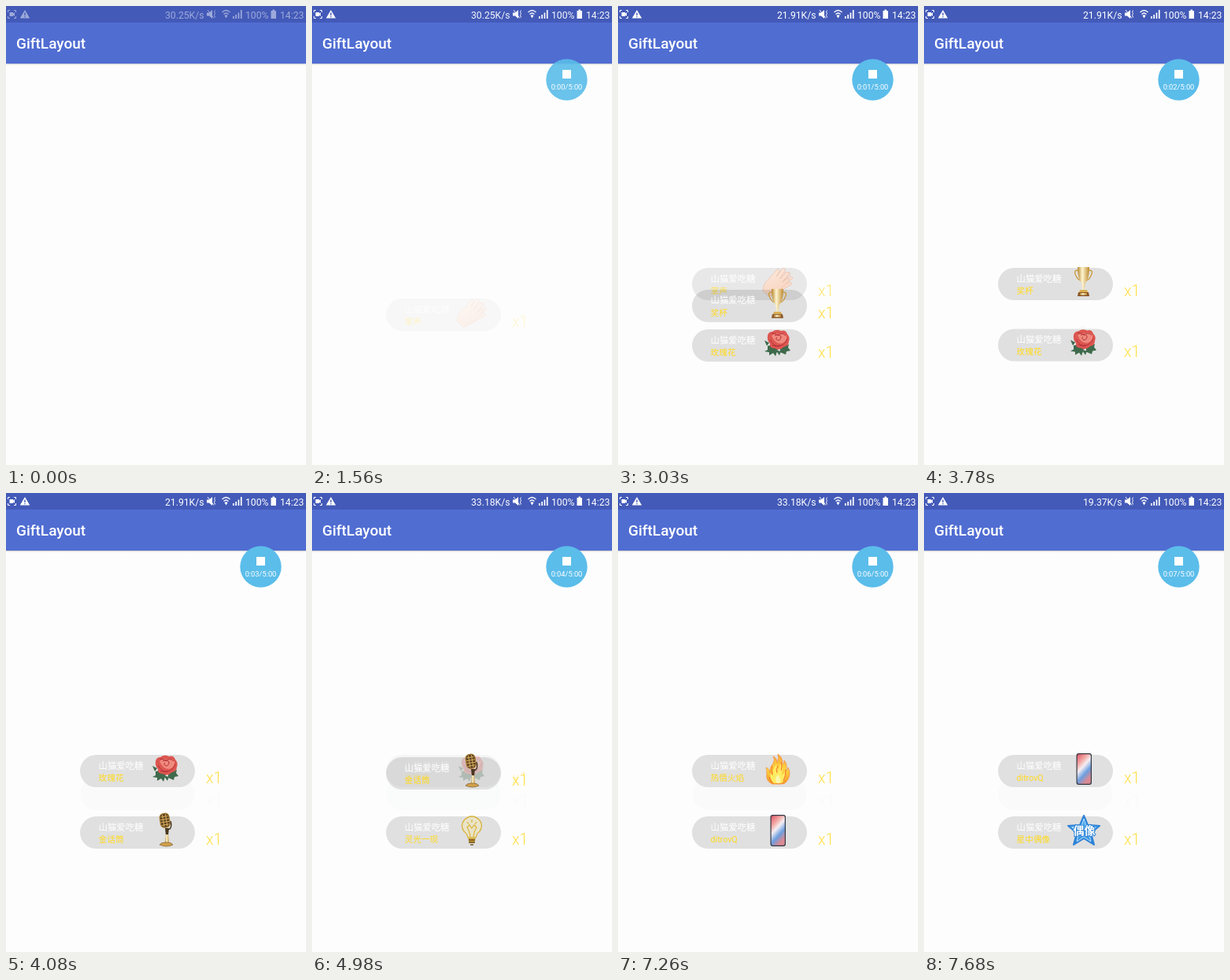
These frames come from a looping animation (381 px wide and 582 px high, 8 s). An HTML page:

```html
<!DOCTYPE html>
<html lang="zh">
<head>
<meta charset="utf-8">
<style>
html, body { margin: 0; width: 100%; height: 100%; overflow: hidden; background: #fdfdfd; }
svg { display: block; width: 100%; height: 100%; font-family: Roboto, "Noto Sans CJK SC", "Noto Sans CJK", sans-serif; }
.status { font-size: 12.2px; fill: #fff; }
.name { font-size: 11.4px; fill: #fff; }
.label { font-size: 10.7px; fill: #ffd91c; }
.count { font-size: 19.5px; font-weight: 300; fill: #ffdf45; }
</style>
</head>
<body>
<svg viewBox="0 0 381 582">
  <defs>
    <linearGradient id="gold"><stop stop-color="#b5852c"/><stop offset=".4" stop-color="#fff6d2"/><stop offset="1" stop-color="#bd8c30"/></linearGradient>
    <linearGradient id="screen" x2=".5" y2="1"><stop stop-color="#e0556a"/><stop offset=".3" stop-color="#f3a9a4"/><stop offset=".5" stop-color="#f6eef2"/><stop offset=".75" stop-color="#6c9fe0"/><stop offset="1" stop-color="#d98a94"/></linearGradient>
    <linearGradient id="sky" x2="0" y2="1"><stop stop-color="#1f79d8"/><stop offset=".5" stop-color="#6cc5f8"/><stop offset="1" stop-color="#1b6fd0"/></linearGradient>
    <linearGradient id="fire" x2="0" y2="1"><stop stop-color="#f9a437"/><stop offset=".5" stop-color="#fdd640"/><stop offset="1" stop-color="#f7982a"/></linearGradient>
    <linearGradient id="skin" x2="1" y2="1"><stop stop-color="#fde3d2"/><stop offset="1" stop-color="#f6c3a8"/></linearGradient>
    <linearGradient id="shade" x2="0" y2="1"><stop stop-color="#000" stop-opacity=".2"/><stop offset="1" stop-color="#000" stop-opacity="0"/></linearGradient>
  </defs>
  <rect width="381" height="582" fill="#fdfdfd"/>
  <rect width="381" height="73" fill="#506dd2"/>
  <rect width="381" height="21" fill="#435ab8"/>
  <rect y="73" width="381" height="2" fill="url(#shade)"/>
  <text x="13" y="54.300" font-size="19" font-weight="500" fill="#fff">GiftLayout</text>
  <g id="status" class="status">
    <path d="M2.500 8V5.500H5M10 5.500h2.500V8M12.500 13v2.500H10M5 15.500H2.500V13" fill="none" stroke="#fff"/>
    <path d="M4.500 8h4.500v1.500l2-1.500v5l-2-1.500V13H4.500z"/>
    <path d="M24 5l6.200 10.500H17.800z"/>
    <path d="M24 8.500v3.500M24 13v1.300" stroke="#435ab8" stroke-width="1.400"/>
    <text id="speed" x="202" y="15.700"></text>
    <path d="M255 8.500h3l4-3.500v11l-4-3.500h-3z"/>
    <path d="M256 5l8 10.500M265.500 5.500l-1 2 1 2-1 2 1 3" fill="none" stroke="#fff"/>
    <path d="M274.500 8q5-5 10 0M276.500 10.500q3-3 6 0" fill="none" stroke="#fff" stroke-width="1.200"/>
    <path d="M277.500 12q2-1.500 4 0l-2 3.500z"/>
    <path d="M288 13h1.700v3h-1.700zM291.300 11h1.700v5h-1.700zM294.600 8.500h1.700v7.500h-1.700zM297.900 5h1.700v11h-1.700z"/>
    <text x="304" y="15.700">100%</text>
    <path d="M338.500 4.500h2.500v1.500h2v10h-6.500V6h2z"/>
    <text x="348" y="15.700">14:23</text>
  </g>
  <g id="trails"></g>
  <g id="gifts"></g>
  <g id="recorder">
    <circle cx="323.500" cy="93.500" r="26.200" fill="#5bbdea"/>
    <rect x="318" y="81" width="11" height="11" fill="#fff"/>
    <text id="timer" x="323.500" y="106" font-size="9.300" fill="#fff" text-anchor="middle"></text>
  </g>
</svg>
<script>
const $ = id => document.getElementById(id);
const clamp = v => Math.max(0, Math.min(1, v));
const LOOP = 8000, TOP = 332, BOTTOM = 410, MOVE = 300;
const moves = [2010, 2910, 3780, 4740, 5640, 6480, 7380];
const seconds = [2010, 3120, 4020, 4950, 5850, 6720, 7620];
const speeds = [[7560, '19.37'], [4860, '33.18'], [2010, '21.91'], [0, '30.25']];

const hand = place => `<g transform="${place}" fill="url(#skin)" stroke="#e0a78c" stroke-width=".5">
  <path d="M-5 14Q-9 8-7 1L-6-11q1-2 3 0l.5 6 .5-10q1.500-2 3 0l.5 10 1.500-9q2-2 3 0l-.5 10 2-6q2-1 2.500 1L8 4Q6 12 3 15z"/></g>`;

const art = {
  clap: hand('translate(204 19) rotate(50) scale(1.2)') + hand('translate(200 18) rotate(36) scale(1.3)'),
  cup: `<path d="M196 3q-7 0-3 7 2 5 6 6M209 3q7 0 3 7-2 5-6 6" fill="none" stroke="#c99a3c" stroke-width="1.300"/>
    <path d="M195-1h15q0 15-5 20l-1.500 9h-2l-1.500-9q-5-5-5-20z" fill="url(#gold)"/>
    <path d="M198 28h9l1 3h-11z" fill="#d9ac4b"/><path d="M196 31h13l1 5h-15z" fill="#8a5526"/>
    <path d="M198 32h9v2.500h-9z" fill="url(#gold)"/>`,
  rose: `<path d="M190 21l9-2 4 6-3 9-3-4-5 3v-4l-6-1 4-2zM206 23l11-4-1 4 3 4-5 1-1 4-7-3zM186 14l6 3-3 4zM200 26l7 2-2 5z" fill="#3f6a4c"/>
    <path d="M190 8q1-5 6-5 5-4 11-1 6-2 8 4 4 4 2 9 0 6-6 7-6 6-12 2-7 0-6-6-4-4-3-10z" fill="#dd5650"/>
    <path d="M195 8q5-4 9-2 6-3 10 2 1 8-7 10-8 0-12-10z" fill="#f08a7e"/>
    <path d="M199 8q4-3 8 1 0 5-4 5-4-2-1-4M193 13q5 9 11 8 7 0 11-9M195 5q6 0 8 3 5-5 10 0M196 20q6 3 10 1" fill="none" stroke="#b5313a"/>`,
  mic: `<g transform="rotate(-9 203 7)"><rect x="196" y="-4" width="12" height="18" rx="5" fill="#5b4424"/>
    <path d="M197.500 0h9M196 3.500h12M196 7h12M197 10.500h10M200-3v16M204-3v16" stroke="#dcae5a"/>
    <rect x="196" y="-4" width="12" height="18" rx="5" fill="none" stroke="#a97a2f"/></g>
    <path d="M209 6q2 7-1 10l-4 1" fill="none" stroke="#4a3820" stroke-width="1.500"/>
    <path d="M202 15h5l-1 9h-3z" fill="#49361f"/><path d="M203 23h3l1 11h-5z" fill="url(#gold)"/>
    <path d="M195 36q2-3 7-3h3q5 0 7 3-8 4-17 0z" fill="#d0a04a" stroke="#6d5024" stroke-width=".6"/>`,
  bulb: `<path d="M198 27q-1-5-5-8-5-7 0-14 10-10 20 0 5 7 0 14-4 3-5 8z" fill="#f5e8ae" fill-opacity=".45" stroke="#d8b23c" stroke-width="1.300"/>
    <path d="M201 26q-1-8-4-12l3-3 3 4 3-4 3 3q-3 4-4 12M197 7l2 3M209 7l-2 3M203 4v4" fill="none" stroke="#dcb133" stroke-width="1.200"/>
    <path d="M198.500 28h9l-1 6h-7z" fill="#d1a02c"/><path d="M199 30h8M199 33h8M201 36h4" stroke="#6d552b" stroke-width="1.300"/>`,
  fire: `<path d="M196 37q-9-4-7-13 0-5-1-8 5 2 5 7-1-7 4-12 3-5 0-9 5 2 5 8 3-5 1-11 6 4 6 12 2 3 2-4 5 6 2 13 3-1 3-4 4 8 0 15-3 6-8 6z" fill="url(#fire)" stroke="#f58a35" stroke-width=".7"/>
    <path d="M198 36q-6-5-4-13l3 4q-1-8 4-15 2 5 1 10 4-5 4-12 4 8 2 16l4-5q2 11-5 15z" fill="#ffec62"/>
    <path d="M192 28q1 5 4 7M196 14q-2 6 0 11M203 14q-3 5-1 9M207 9q2 6 0 11M213 19q0 8-3 14" fill="none" stroke="#f0622d" stroke-width=".9"/>
    <path d="M202 36q-4-5 1-11 5 6 2 11z" fill="#fff6b0"/>`,
  phone: `<rect x="193.500" y="-2" width="19.500" height="40" rx="3" fill="#333944"/>
    <rect x="194.700" y="-.7" width="17.100" height="37.400" rx="2" fill="url(#screen)"/>`,
  star: `<path d="M203-1l5 12 15 1-11 9 4 15-13-8-13 8 4-15-11-9 15-1z" fill="url(#sky)" stroke="#2f82d6" stroke-width="2" stroke-linejoin="round"/>
    <path d="M203 3l3 10 12 1-9 7 3 11-9-6-9 6 3-11-9-7 12-1z" fill="none" stroke="#b9e6ff"/>
    <text x="203.500" y="23" font-size="14" font-weight="700" fill="#fff" text-anchor="middle" stroke="#2d84d8" stroke-width="2" paint-order="stroke">偶像</text>`
};

const gifts = [
  ['掌声', 'clap'], ['奖杯', 'cup'], ['玫瑰花', 'rose'], ['金话筒', 'mic'],
  ['灵光一现', 'bulb'], ['热情火焰', 'fire'], ['ditrovQ', 'phone'], ['星中偶像', 'star']
];

const pill = '<rect x="94" width="146" height="41" rx="20.500"';
$('gifts').innerHTML = gifts.map(([label, icon]) => `<g>
  ${pill} fill="#000805" fill-opacity=".115"/>
  <text class="name" x="117.500" y="17.500">山猫爱吃糖</text>
  <text class="label" x="117.500" y="33">${label}</text>
  ${art[icon]}<text class="count" x="254" y="36">x1</text></g>`).join('');

// Faint afterimages left below a bar that has moved up
const ghost = (y, alpha) => `<g transform="translate(0 ${y})" opacity="${alpha}">${pill} fill="#e0e2e1"/>
  <text x="254" y="36" font-size="20" fill="#ddd">x1</text></g>`;
const cover = y => `<g transform="translate(0 ${y})">${pill} fill="#fdfdfd"/></g>`;

function gift(i, t) {
  const enter = i ? i > 1 ? moves[i - 1] : 2280 : 1500;
  const fadeIn = i > 1 ? 60 : 270;
  const up = clamp((t - moves[i]) / MOVE) || 0;
  const p = 1 - (1 - up) ** 2;
  const from = i ? BOTTOM : 371;
  const out = clamp((t - moves[i + 1]) / MOVE) || 0;
  return { p, y: from + (TOP - from) * p, alpha: clamp((t - enter) / fadeIn) * (1 - out ** 1.5), out };
}

function trail(i, { p, y, out }, t) {
  if (!p || out) return '';
  if (i) return ghost(361, .07 * p) + cover(y);
  const k = p * clamp((2550 - t) / 250);
  return k ? ghost(371, .17 * k) + ghost(349, .4 * k) + cover(y) : '';
}

function draw(t) {
  const on = clamp((t - 1380) / 200);
  $('status').setAttribute('opacity', .48 + .52 * on);
  $('recorder').setAttribute('opacity', on);
  $('timer').textContent = `0:0${seconds.filter(s => t >= s).length}/5:00`;
  $('speed').textContent = speeds.find(s => t >= s[0])[1] + 'K/s';
  let trails = '';
  [...$('gifts').children].forEach((el, i) => {
    const g = gift(i, t);
    el.setAttribute('transform', `translate(0 ${g.y})`);
    el.setAttribute('opacity', g.alpha);
    trails += trail(i, g, t);
  });
  $('trails').innerHTML = trails;
}

const start = performance.now();
function tick() {
  draw((performance.now() - start) % LOOP);
  requestAnimationFrame(tick);
}
tick();
</script>
</body>
</html>
```
